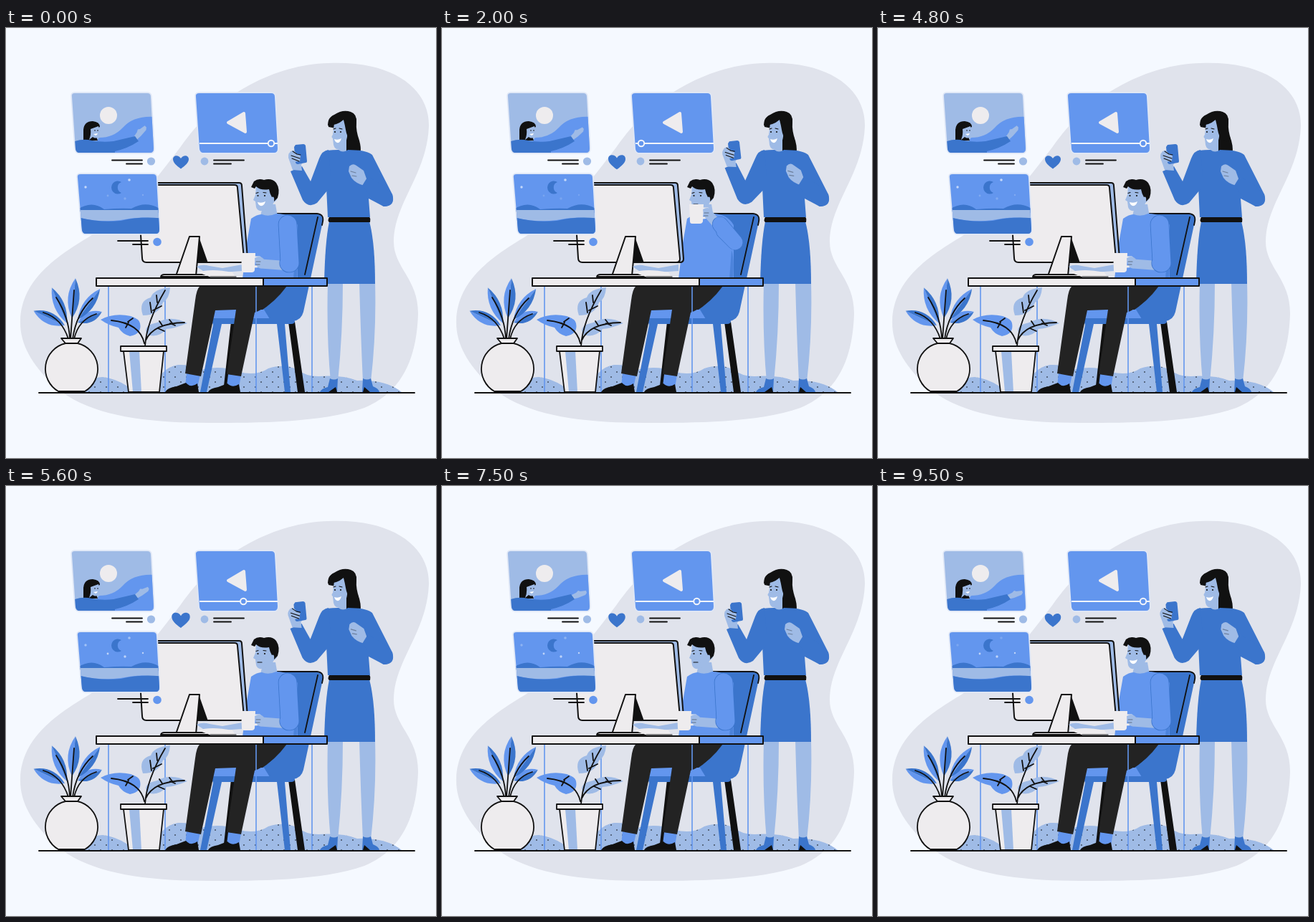
Write an HTML page that moves like this. It is 600 by 600 pixels and loops after 9600 ms.

```html
<!DOCTYPE html>
<html lang="en">
<head>
<meta charset="utf-8">
<title>Video call at the desk</title>
<style>
html, body { margin: 0; width: 100%; height: 100%; overflow: hidden; background: #f5f9ff; }
svg { display: block; width: 100vw; height: 100vh; }
.n { fill: #3b75cc; }
.b { fill: #6396ee; }
.p { fill: #9fbbe6; }
.k { fill: #111; }
.t { fill: #232323; }
.w { fill: #eeecee; }
.o { stroke: #111; stroke-width: 2; stroke-linejoin: round; stroke-linecap: round; }
.l { fill: none; stroke: #111; stroke-width: 1.8; stroke-linecap: round; stroke-linejoin: round; }
.thin { stroke-width: 1.1; }
.leg { stroke: #6396ee; stroke-width: 1.6; }
.card { stroke: #dfe7f6; stroke-width: 3.4; paint-order: stroke; }
.arm { fill: none; stroke-linecap: round; stroke-linejoin: round; }
</style>
</head>
<body>
<svg viewBox="0 0 600 600">
<defs>
  <pattern id="dots" width="16" height="14" patternUnits="userSpaceOnUse">
    <circle cx="4" cy="4" r=".8"/><circle cx="12" cy="11" r=".8"/>
  </pattern>
  <path id="card1" d="M96 91H197Q202 91 202 96L206 168Q206 174 201 174H102Q98 174 97 169L92 96Q91 91 96 91Z"/>
  <path id="card2" d="M104 204H205Q210 204 210 209L214 281Q214 287 209 287H111Q107 287 106 282L100 209Q99 204 104 204Z"/>
  <path id="card3" d="M270 91H370Q375 91 375 96L379 168Q379 174 374 174H275Q271 174 270 169L265 96Q264 91 270 91Z"/>
  <clipPath id="clip1"><use href="#card1"/></clipPath>
  <clipPath id="clip2"><use href="#card2"/></clipPath>
  <path id="mounds" d="M96 508Q112 488 135 487Q152 489 168 499L178 508ZM205 508Q214 474 240 470Q258 469 272 477Q300 470 325 480Q350 486 366 475Q388 468 405 476Q418 486 436 486Q470 484 490 492Q530 490 552 508Z"/>
</defs>

<path fill="#e0e3ec" d="M450 49C540 45 592 85 590 138C587 205 541 245 541 298C541 335 576 350 575 400C573 450 560 505 500 530C440 551 350 551 285 551C190 551 110 540 65 497C35 468 19 440 20 408C22 350 72 318 118 290C180 252 208 212 242 168C288 100 368 51 450 49Z"/>
<use href="#mounds" class="p"/><use href="#mounds" fill="url(#dots)"/>
<path class="leg" d="M222 360V508M427 360V508"/>

<!-- woman -->
<path class="p" d="M449 355H470Q470 425 463 494H453Q447 430 449 355ZM493 355H515Q517 425 509 494H498Q495 430 493 355Z"/>
<path class="n" d="M438 508Q440 503 449 501L452 489Q458 492 463 489L462 508ZM497 508L498 489Q504 492 509 489L512 500Q520 503 521 508Z"/>
<path class="k" d="M450 508L460 501L462 508ZM498 508L500 501L508 508Z"/>
<path class="n" d="M451 270H507Q515 300 515 357H444Q445 300 451 270Z"/>
<path class="k" d="M450 138Q447 126 458 121Q470 113 481 117Q490 120 489 132Q488 143 493 157Q498 176 490 179Q481 181 474 172L460 140Z"/>
<path class="p" d="M465 158L475 155V173Q470 177 464 172Z"/>
<path class="n" d="M447 171Q456 170 464 170Q470 175 477 170Q503 170 511 177L539 232Q543 249 527 249L506 238L508 264H449L447 222Z"/>
<path class="p" d="M458 133L456 149Q453 152 456 154L457 163Q459 171 466 169Q474 166 476 152L477 139L470 126Z"/>
<path class="k" d="M449 136Q450 124 464 119Q483 116 487 130L490 158Q477 160 474 142Q473 136 471 128Q462 136 449 136Z"/>
<circle class="k" cx="459" cy="145" r="1.1"/><circle class="k" cx="467" cy="145" r="1.1"/>
<path class="l thin" d="M457 141L460 140M465 140L469 141"/>
<path fill="#fff" d="M458 155Q463 157 468 154Q466 161 462 160Q459 159 458 155Z"/>
<path class="k" d="M451 264H507Q509 265 508 271H451Q448 269 451 264Z"/>
<path class="n" id="raised"/>
<g id="phone">
  <path class="p" d="M400 198L394 181Q393 173 401 171L412 172L417 183L412 191L413 199Z"/>
  <path class="n" d="M404 163L415 162Q417 162 418 164L420 186Q420 188 418 188L407 190Q405 190 404 188L402 166Z"/>
  <path class="p" d="M396 173Q402 168 405 175L411 178L410 186L399 187Z"/>
  <path class="l thin" d="M400 172L406 176L411 177M398 178L410 182M399 182L409 186"/>
</g>
<g id="fist">
  <path class="p" d="M479 193Q484 188 489 192L499 199L504 213L500 220Q488 217 482 209L478 200Z"/>
  <path class="l thin" stroke-opacity=".35" d="M481 200L488 202M483 206L489 207"/>
</g>
<path class="n" d="M539 232Q544 249 527 249Q511 240 497 220L505 207L524 218Z"/>

<!-- chair -->
<path class="n" d="M375 259H434Q444 260 442 270L415 396Q412 408 400 409H350L340 360Z"/>
<path class="l" d="M375 259H434Q444 260 442 270L441 275M435 264L417 344"/>
<path class="k" d="M314 410H323L313 508H303ZM394 410H403L417 508H407Z"/>
<path class="t" d="M330 360H392Q376 382 352 397Z"/>
<path class="b" d="M289 393H360L368 406H288Z"/>
<path class="n" d="M288 405H399Q403 406 403 410Q402 413 398 413H389L397 508H389L378 413H301L280 508H271L289 414Q286 408 288 405Z"/>

<!-- sitting legs -->
<path class="b" d="M252 481L271 484L267 502L250 500ZM310 483L328 484L325 502L308 500Z"/>
<path class="k" d="M222 508Q225 502 238 500L251 495Q258 503 267 496L269 508ZM282 508Q284 503 296 501L309 496Q316 503 325 497L327 508Z"/>
<path class="t" d="M270 361H388Q376 383 352 395L347 397L328 486L308 483L321 393L292 394L272 486L250 482L264 380Q266 364 270 361Z"/>

<!-- man -->
<path class="p" d="M359 246H376L379 263Q367 269 355 262Z"/>
<path class="b" d="M342 266Q350 260 357 260Q366 264 377 259Q398 259 407 275V350H330L336 300Z"/>
<path class="n" opacity=".55" d="M404 310Q408 320 406 350H401Z"/>
<path class="p" d="M349 221L348 233L345 240L348 242L349 250Q351 256 357 255Q369 254 374 243Q380 240 378 233L376 220L352 217Z"/>
<path class="k" d="M342 222L346 214Q352 209 360 212Q371 209 377 216Q383 225 379 237L374 242Q375 234 371 236Q368 231 367 225Q355 227 349 221L347 224Z"/>
<circle class="k" cx="351.5" cy="234" r="1.1"/><circle class="k" cx="361" cy="234" r="1.1"/>
<path class="l thin" d="M349 230.500L352 229.500M359 229.500L363 230"/>
<path class="l thin" id="mouth" d="M351 246L357 246"/>
<path id="smile" fill="#fff" d="M351 243Q357 245 362 242Q360 249 355 248Q352 247 351 243Z"/>

<!-- monitor -->
<path class="p o" d="M192 216H325Q329 216 329 220L337 322Q337 327 332 327H300Z"/>
<path class="w o" d="M188 219H319Q323 219 323 223L332 322Q332 327 327 327H196Q190 327 190 321L184 224Z"/>
<path class="k" d="M269 291L282 328H266Z"/>
<path class="w o" d="M256 291H270L265 346H237Z"/>
<path class="w o" d="M216 347Q217 344 221 344H280Q284 345 284 347Z"/>
<path class="p" d="M266 333Q274 329 284 332L302 335L330 330V339L300 341L275 339Z"/>
<path class="w" d="M268 341Q285 335 316 341L320 347H284Z"/>
<path class="l thin" d="M285 347H321"/>

<!-- drinking arm, posed by script -->
<path class="arm" id="fore" stroke="#9fbbe6" stroke-width="13"/>
<path class="arm" id="sleeveEdge" stroke="#3b75cc"/>
<path class="arm" id="sleeve" stroke="#6396ee"/>
<g id="cup">
  <path class="arm" stroke="#eeecee" stroke-width="3" d="M8 -7H16Q18 -6 17 3Q16 6 8 6"/>
  <path class="w" d="M-10 -13H10L9 11Q8 14 5 14H-6Q-9 14 -9 11Z"/>
  <path class="p" d="M9 -6Q17 -11 22 -4L20 8Q14 9 11 4Z"/>
  <path class="l thin" stroke-opacity=".45" d="M11 -1H17M11 3H16"/>
</g>

<!-- desk -->
<path class="leg" d="M143 360V508M349 360V508"/>
<path class="w o" d="M126 349H359V360H126Z"/>
<path class="b o" d="M359 349H448V360H359Z"/>

<!-- vase -->
<g id="leaves"></g>
<path class="l" d="M90 434L95 366M89 434Q88 404 70 376M87 434Q78 405 52 397M93 434Q98 398 121 377M95 434Q101 407 126 399"/>
<path id="vase" class="w" d="M77 433H105L100 440A36.500 36.500 0 0 1 110 507H73A36.500 36.500 0 0 1 83 440Z"/>
<path class="p" d="M80 443Q62 454 63 476Q64 496 77 507H89Q73 494 73 474Q74 452 89 440Z"/>
<use href="#vase" style="fill:none"/>
<path class="l" d="M77 433H105L100 440A36.500 36.500 0 0 1 110 507H73A36.500 36.500 0 0 1 83 440ZM83 440H100"/>

<!-- potted plant -->
<path class="p" d="M191 401Q184 381 202 376Q206 364 229 362Q228 378 219 383Q213 401 191 401ZM197 428Q190 415 211 411Q231 400 253 412Q236 419 224 420Q213 433 197 428Z"/>
<path class="b" d="M132 407Q150 397 174 402Q186 406 187 412Q190 427 173 430Q162 427 157 418Q143 415 132 407Z"/>
<path class="l" d="M194 444Q196 410 222 366M203 397L201 383M211 383L210 373M205 394L217 388M195 436Q205 412 249 411M212 419L221 423M218 415L214 409M229 412L236 415M232 412L228 407M193 440Q187 412 147 408M170 410L177 405M171 411L167 418"/>
<path class="w" d="M160 444H224V451H220L214 508H171L164 451H160Z"/>
<path class="p" d="M172 451H186L189 508H177Z"/>
<path class="l" d="M160 444H224V451H160ZM164 451L171 508H214L220 451"/>
<path class="o" d="M46 509H570"/>

<!-- portrait card -->
<use href="#card1" class="p card"/>
<g clip-path="url(#clip1)">
  <circle class="w" cx="143" cy="122" r="12"/>
  <path class="b" d="M130 153Q150 153 163 139Q178 122 208 124V180H110Z"/>
  <path class="k" d="M108 157V142Q109 130 121 130Q131 131 131 138L122 142L128 157Z"/>
  <path class="p" d="M118 141L129 137L131 145L128 152Q125 155 121 152L116 156Q119 149 118 141Z"/>
  <circle class="k" cx="124" cy="143" r=".8"/><circle class="k" cx="128" cy="143" r=".8"/>
  <path fill="#fff" d="M122 148L128 147Q127 150 125 150Z"/>
  <g id="wave"><path class="p" d="M179 153L187 149L190 146L193 147L201 146L202 149L200 152L190 156L182 158Z"/></g>
  <path class="n" d="M96 158Q108 154 120 157Q135 160 150 158L180 151L185 158Q170 168 152 172V180H96Z"/>
</g>

<!-- night card -->
<use href="#card2" class="b card"/>
<g clip-path="url(#clip2)">
  <path class="n" d="M161 215A9 9 0 1 0 161 230A8 8 0 0 1 161 215ZM100 253Q120 240 137 253Q160 251 175 252Q196 240 216 253V258H100Z"/>
  <path class="p" d="M100 254H220V268Q190 261 160 268Q130 272 100 264Z"/>
  <path class="n" d="M100 264Q130 272 160 269Q190 262 220 266V290H100Z"/>
  <g fill="#cfe0fb" id="starsA"><circle cx="111" cy="222" r="1.7"/><circle cx="172" cy="212" r="1.8"/></g>
  <g fill="#cfe0fb" id="starsB"><circle cx="142" cy="234" r="1.4"/><circle cx="166" cy="238" r="1.7"/><circle cx="191" cy="233" r="1.2"/></g>
</g>

<!-- video card -->
<use href="#card3" class="b card"/>
<path fill="#eeecee" stroke="#eeecee" stroke-width="4" stroke-linejoin="round" d="M310 132L332 119L334 145Z"/>
<path stroke="#f2f5fb" stroke-width="2" d="M270 161H379"/>
<circle id="knob" class="b" cy="161" r="4.2" stroke="#f2f5fb" stroke-width="2"/>

<!-- captions -->
<path class="l" d="M148 184.500H190M168 189.500H190M290 184.500H332M290 189.500H314M156 297H198M177 302H198"/>
<circle class="p" cx="202.500" cy="186" r="5.600"/>
<circle class="p" cx="277" cy="186" r="5.400"/>
<circle class="b" cx="211" cy="298.500" r="5.800"/>
<g id="heart"><path class="n" d="M0 9.500C-6 5-11 1-11-4C-11-10-3-10.500 0-5C3-10.500 11-10 11-4C11 1 6 5 0 9.500Z"/></g>
</svg>
<script>
const $ = id => document.getElementById(id);
const set = (id, name, value) => $(id).setAttribute(name, value);
const clamp = x => Math.min(1, Math.max(0, x));
const mix = (a, b, u) => a + (b - a) * u;
const ramp = (t, a, b) => { const u = clamp((t - a) / (b - a)); return u * u * (3 - 2 * u); };

// Two-tone leaf from base (x, y), with its length, half width and angle.
const leaf = (x, y, len, w, deg) => `<g transform="translate(${x} ${y}) rotate(${deg})">
  <path class="b" d="M0 0Q${len * .5} ${-w * 2} ${len} 0Z"/>
  <path class="n" d="M0 0Q${len * .5} ${w * 2} ${len} 0Z"/></g>`;
$('leaves').innerHTML = [
  [82, 415, 48, 8, 205], [85, 412, 54, 7, 247], [100, 411, 37, 7, -24],
  [100, 407, 53, 7, -54], [92, 405, 56, 8, -85]
].map(a => leaf(...a)).join('');

function manArm(u) {
  const ex = mix(396, 409, u), ey = mix(328, 299, u);
  const hx = mix(353, 370, u), hy = mix(328, 260, u);
  const k = mix(.03, .4, u);
  const upper = `M${mix(393, 388, u)} 274L${ex} ${ey}L${mix(ex, hx, k)} ${mix(ey, hy, k)}`;
  set('fore', 'd', `M${ex} ${ey + 4}L${hx + 3} ${hy + 1}`);
  for (const id of ['sleeve', 'sleeveEdge']) set(id, 'd', upper);
  set('sleeve', 'stroke-width', mix(25, 21, u));
  set('sleeveEdge', 'stroke-width', mix(26.6, 22.2, u));
  set('cup', 'transform', `translate(${hx - 15} ${hy - 1})`);
}

function womanArms(u) {
  const x = -4 * u, y = -8 * u, e = -3 * u, f = -2 * u;
  set('raised', 'd', `M450 170Q441 171 437 182L${425 + e} ${214 + f}L${413 + x} ${193 + y}` +
    `L${397 + x} ${200 + y}L${414 + e} ${240 + f}Q${422 + e} ${252 + f} ${434 + e} ${244 + f}L454 220Z`);
  set('phone', 'transform', `translate(${x} ${y}) rotate(${-2 * u} 408 195)`);
  set('fist', 'transform', `translate(${3 * u} ${-u})`);
}

function draw(ms) {
  const t = Math.floor(ms % 9600 / 100) * 100;
  const a = t % 2400, b = t % 4800;

  womanArms(a > 700 ? Math.sin(Math.PI * (a - 700) / 1700) ** 1.3 : 0);
  manArm(ramp(b, 1050, 1550) - ramp(b, 2200, 2650));
  const smiling = b < 700 || b > 4150;
  set('smile', 'opacity', smiling ? 1 : 0);
  set('mouth', 'opacity', smiling ? 0 : 1);

  set('knob', 'cx', mix(370, 278, clamp(a / 1900) - ramp(a, 2000, 2300)));
  set('heart', 'transform', `translate(244 187) scale(${1 + .18 * Math.sin(Math.PI * a / 2400)})`);

  const lift = Math.max(0, 1 - b / 300, ...[900, 1950, 3400].map(c => 1 - Math.abs(b - c) / 200));
  set('wave', 'transform', `rotate(${-28 * lift} 178 156)`);

  const glow = .5 - .5 * Math.cos(2 * Math.PI * (a + 300) / 2400);
  set('starsA', 'opacity', t < 5500 ? .9 : .2 + .4 * glow);
  set('starsB', 'opacity', t < 5500 ? .2 + .5 * glow : .85);
}

function tick() {
  draw(performance.now());
  requestAnimationFrame(tick);
}
tick();
</script>
</body>
</html>
```
